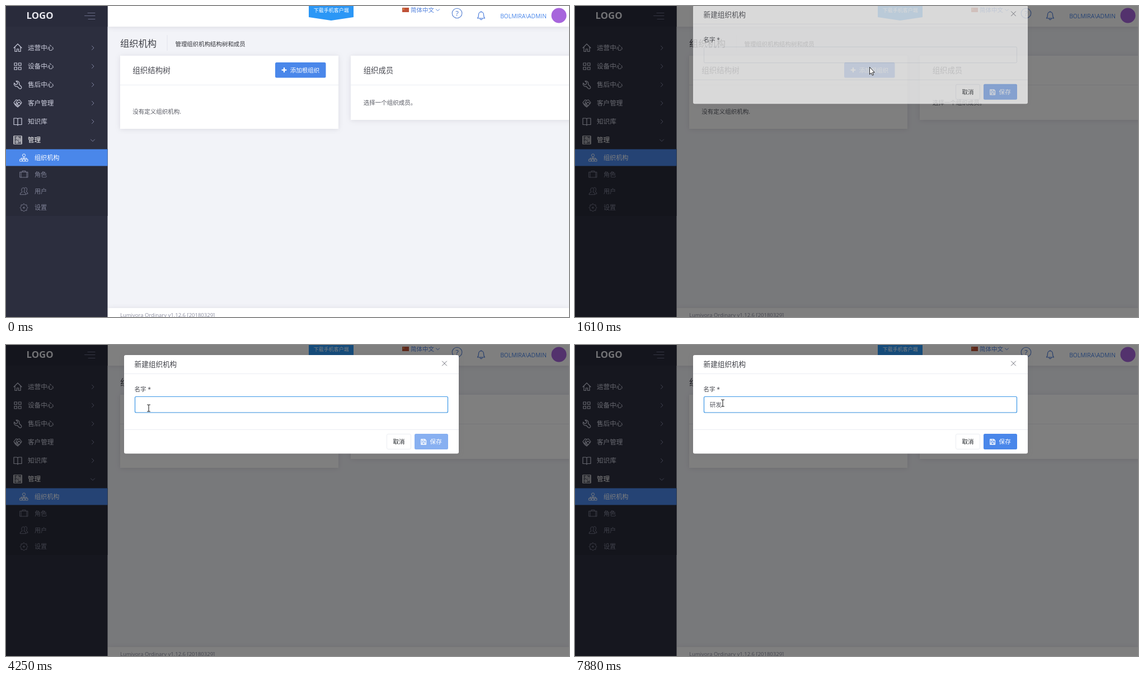
An HTML page for the animation above (8 s loop, 1006 px wide and 557 px high).

```html
<!DOCTYPE html>
<html lang="zh-CN">
<head>
<meta charset="utf-8">
<style>
html, body { margin: 0; width: 100%; height: 100%; overflow: hidden; background: #f2f3f8; }
svg { display: block; width: 1006px; height: 557px; }
text { font-family: "Open Sans", "Noto Sans CJK SC", "Noto Sans CJK", sans-serif; white-space: pre; }
.card { fill: #fff; filter: drop-shadow(0 1px 5px rgba(69, 65, 78, .13)); }
.ico { fill: none; stroke-linecap: round; stroke-linejoin: round; }
.ime { font-family: "Liberation Sans", "Noto Sans CJK SC", "Noto Sans CJK", sans-serif; }
.num { font-family: "Liberation Mono", monospace; }
</style>
</head>
<body>
<svg id="stage" viewBox="0 0 1006 557"></svg>
<script>
const BLUE = '#4a87ea';
const rect = (x, y, w, h, fill, more = '') =>
  `<rect x="${x}" y="${y}" width="${w}" height="${h}" fill="${fill}" ${more}/>`;
const text = (x, y, size, fill, str, more = '') =>
  `<text x="${x}" y="${y}" font-size="${size}" fill="${fill}" ${more}>${str}</text>`;
const icon = (x, y, d, color, width = 1, more = '') =>
  `<path class="ico" transform="translate(${x} ${y})" d="${d}" stroke="${color}" stroke-width="${width}" ${more}/>`;
const ring = (x, y, r) => `M${x - r} ${y}a${r} ${r} 0 1 0 ${2 * r} 0a${r} ${r} 0 1 0 ${-2 * r} 0`;
const box = (x, y, w, h) => `M${x} ${y}h${w}v${h}h${-w}z`;

const menu = [
  ['运营中心', 'M-7 0L0-7 7 0M-5-1.5V6.5H-1.5V2H1.5V6.5H5V-1.5'],
  ['设备中心', box(-6, -6, 4.5, 4.5) + box(1.5, -6, 4.5, 4.5) + box(-6, 1.5, 4.5, 4.5) + box(1.5, 1.5, 4.5, 4.5)],
  ['售后中心', 'M-3-6.5L0-3.5-1-1-3.5 0-6.5-3C-7.5 1-4 4-1 3L3 7C5 8 8 6 6.5 3.5L2.5-.5C4-4 1-7.5-3-6.5'],
  ['客户管理', 'M-7-1L-3-6 0-5 3-6 7-1 4 3 0 7-4 4ZM0-5L-3-1-1 1 2-2 6 1M-5 1L0 5M-2 1L2 4'],
  ['知识库', 'M0-5Q-1-6-2.5-6H-7V5.5H-2Q0 5.5 0 7 0 5.5 2 5.5H7V-6H2.5Q1-6 0-5V6'],
  ['管理', box(-7, -7, 14, 14) + 'M-7-3.5H-2M1-3.5H7M-7 0H2M5 0H7M-7 3.5H-3M0 3.5H7' + ring(-.5, -3.5, 1.5) + ring(3.5, 0, 1.5) + ring(-1.5, 3.5, 1.5)],
];
const submenu = [
  ['组织机构', ring(0, -4, 2.6) + 'M0-1.4V3M-5 3V1H5V3' + box(-7, 3, 4, 3.5) + box(-2, 3, 4, 3.5) + box(3, 3, 4, 3.5)],
  ['角色', box(-7, -4, 14, 9.5) + 'M-3-4V-6H3V-4M-5-4V5.5M5-4V5.5'],
  ['用户', 'M-7 6Q-7 3-3 2-5-1-4-4-2-7 1-5 2-2 0 2 4 3 4 6ZM2-6Q6-7 5.5-2 5 0 4 1 7 2 7 5H5'],
  ['设置', 'M0-7L2-5 5-5 5-2 7 0 5 2 5 5 2 5 0 7-2 5-5 5-5 2-7 0-5-2-5-5-2-5Z' + ring(0, 0, 1.2)],
];

const sidebar = rect(0, 0, 181.5, 557, '#2c2e3e') + rect(0, 0, 181.5, 37, '#292b3b') +
  rect(0, 256, 181.5, 120, '#282a38') + rect(0, 256.5, 181.5, 30, BLUE) +
  text(36.5, 23, 16.8, '#e6e6ec', 'LOGO', 'font-weight="700"') +
  icon(0, 0, 'M146 12.5H159M140.5 17.5H159M147 23.5H159', '#6a6d88') +
  menu.map(([label, d], i) => {
    const y = 75 + 33 * i, last = i == 5;
    return icon(21, y, d, last ? '#fff' : '#c9cbdb', 1.2) +
      text(39, y + 4.2, 11.6, last ? '#fff' : '#cfd1e0', label) +
      icon(155, y, last ? 'M-3.5-1L0 2.5 3.5-1' : 'M-1.5-3.5L2 0-1.5 3.5', '#7f83a0');
  }).join('') +
  submenu.map(([label, d], i) => {
    const y = 271.5 + 29.9 * i, c = i ? '#7e8196' : '#fff';
    return icon(32, y, d, c, .9) + text(51, y + 4.2, 11.1, c, label);
  }).join('');

const header = rect(181.5, 0, 825, 37, '#fff', 'class="card"') +
  `<path d="M541 0H621V20L581 26 541 20Z" fill="#2b97f6"/>` +
  text(549.7, 11, 9, '#fff', '下载手机客户端', 'font-weight="500"') +
  rect(708, 3, 12, 8, '#bf5238') + rect(709.5, 4.5, 2, 2, '#e8b04a') +
  text(723, 11.3, 10.5, '#4f7fdc', '简体中文') + icon(771.5, 7, 'M-3-1.2L0 1.8 3-1.2', '#4f7fdc') +
  icon(806, 13, ring(0, 0, 8.8), '#5580d2', 1.1) +
  text(806, 17.7, 13, '#4f7bd0', '?', 'text-anchor="middle"') +
  icon(849, 17, 'M-6.5 5H6.5Q4.5 3 4.5-1.5C4.5-8-4.5-8-4.5-1.5Q-4.5 3-6.5 5ZM-2 6Q0 9.5 2 6M0-6.5V-7.5', '#4f7fdc', 1.2, 'id="bell"') +
  text(966, 21.7, 10.3, BLUE, 'BOLMIRA\\ADMIN', 'text-anchor="end"') +
  '<circle cx="988" cy="17" r="13.5" fill="#a765dc"/>';

const page = text(204, 72.8, 16.3, '#3f4047', '组织机构') + rect(287.5, 52, 1, 28, '#e2e4ec') +
  text(302.5, 71.8, 10.45, '#33343a', '管理组织机构结构树和成员') +
  rect(204, 89, 390, 131, '#fff', 'class="card"') + rect(204, 141, 390, 1, '#ebedf2') +
  rect(616, 89, 420, 115, '#fff', 'class="card"') + rect(616, 141, 390, 1, '#ebedf2') +
  text(226.3, 119.5, 13.5, '#494a52', '组织结构树') + text(638.7, 119.5, 13.4, '#494a52', '组织成员') +
  text(226.3, 193, 10.5, '#575962', '没有定义组织机构.') + text(638.7, 177.3, 10.5, '#575962', '选择一个组织成员。') +
  rect(481, 101, 90.5, 27.5, BLUE, 'rx="2.5"') + icon(497, 114.6, 'M-3.5 0H3.5M0-3.5V3.5', '#fff', 2.3) +
  text(507.7, 118.5, 10.5, '#fff', '添加根组织') +
  rect(181.5, 541, 825, 16, '#fff', 'class="card"') +
  text(204, 557.3, 9.5, '#8b8da0', 'Lumivora Ordinary v1.12.6 [20180329]');

const modal = '<g id="modal">' + rect(211, 18, 598, 176.5, '#fff', 'rx="3" class="card"') +
  text(229.6, 39.4, 12.6, '#3f4047', '新建组织机构') + icon(783.5, 33, 'M-4-4L4 4M4-4L-4 4', '#6c6e78') +
  rect(211, 51, 598, 1, '#ebedf2') + rect(211, 151, 598, 1, '#ebedf2') +
  text(229.6, 83, 10.5, '#3f4047', '名字 *') +
  rect(230.5, 92.5, 559, 28.5, '#fff', 'rx="2" stroke="#e6e8ee"') +
  rect(230.5, 92.5, 559, 28.5, 'none', 'rx="2" stroke="#3b97e6" stroke-width="1.2" id="focus"') +
  text(240.7, 110.6, 10.6, '#575962', '研发', 'id="value"') + rect(241, 99, 1, 15, '#333', 'id="caret"') +
  rect(680.5, 159.5, 43, 27, '#fff', 'rx="2.5" stroke="#ebedf2"') + text(691.5, 177, 10.5, '#212529', '取消') +
  '<g id="save">' + rect(730, 159, 60, 28, BLUE, 'rx="2.5"') +
  icon(746, 173.5, 'M-4.2-4.5H2.5L4.5-2.5V4.5H-4.2ZM-2-4.5V-1.5H2V-4.5M-2.3 4.5V1.2H2.5V4.5', '#fff', 1.3) +
  text(757.6, 177.4, 10.6, '#fff', '保存', 'font-weight="500"') + '</g></g>';

const leaf = (x, y, len, angle, fill) =>
  `<path transform="translate(${x} ${y}) rotate(${angle})" d="M0 0Q${len * .45} ${-len * .42} ${len} 0Q${len * .45} ${len * .36} 0 0" fill="${fill}" stroke="#4f8c22" stroke-width=".6"/>`;
const blossom = (x, y, r) => [0, 72, 144, 216, 288].map(a =>
  `<ellipse cx="${r * .58}" rx="${r * .52}" ry="${r * .4}" transform="translate(${x} ${y}) rotate(${a - 90})" fill="#f9e3dc" stroke="#d59a94" stroke-width=".6"/>`
).join('') + `<circle cx="${x}" cy="${y}" r="${r * .2}" fill="#b9c05a"/>`;

const popup = `<defs><linearGradient id="paper"><stop offset="0" stop-color="#e3d8c1"/><stop offset=".35" stop-color="#eee7d6"/>
  <stop offset=".72" stop-color="#e6dcc5"/><stop offset=".8" stop-color="#d5e0a8"/><stop offset="1" stop-color="#bfd48c"/></linearGradient></defs>
  <g id="popup">` +
  rect(252, 121.5, 316, 50, 'url(#paper)', 'rx="7" stroke="#b9ab92" style="filter:drop-shadow(0 1px 1.5px #0008)"') +
  rect(262, 123.5, 220, 23, '#ddd2b9', 'opacity=".45"') +
  leaf(520, 143, 30, -45, '#6aae2e') + leaf(532, 137, 33, -38, '#83c43c') + leaf(528, 146, 32, 8, '#74b834') +
  leaf(524, 140, 22, -100, '#9ccb58') + leaf(536, 150, 18, 40, '#a8d06a') +
  blossom(507, 140, 12) + blossom(527, 148, 11) + blossom(511, 156, 13) +
  '<text class="ime" id="typed" x="263" y="140" font-size="12" font-weight="700" fill="#2c7410"></text>' +
  rect(297, 130, 1, 13, '#8c8a80', 'id="mark"') + '<g id="words"></g>' +
  '<path d="M457 155.5V162.5L453 159Z" fill="#c3b58e"/><path d="M461.5 154.5V163.5L466.5 159Z" fill="#2f7a12"/>' +
  rect(471.5, 153.5, 10, 11, '#eef0d4', 'stroke="#8aa060"') + '<path d="M473.5 157.5H479.5L476.5 161Z" fill="#2f7a12"/></g>';

const pointers = `<g id="pointer">
  <path id="arrow" d="M.5 .5V13.5L3.4 10.8 5.4 15.2 7.4 14.3 5.5 10H9.3Z" fill="#fff" stroke="#111" stroke-width=".9"/>
  <path id="hand" d="M-1.5 1.5Q0-.8 1.5 1.5V6.5Q3 5.5 4 7 5.5 6 6.3 7.7 8 7 8.5 9V13L7 17.5H-1.5Q-3-14 -1.5 17.5L-5.5 11Q-5.5 8.5-3.5 9.5L-1.5 11.5Z" fill="#fff" stroke="#111" stroke-width=".9"/>
  <path id="beam" class="ico" d="M-2.5-6H-1Q0-6 0-5 0-6 1-6H2.5M0-5V5M-2.5 6H-1Q0 6 0 5 0 6 1 6H2.5" stroke="#222" stroke-width="1.1"/></g>`;

const stage = document.getElementById('stage');
stage.innerHTML = rect(0, 0, 1006, 557, '#f2f3f8') + page + header + sidebar +
  rect(0, 0, 1006, 557, '#000', 'id="shade"') + modal + popup + pointers;

const el = id => document.getElementById(id);
const show = (id, on) => el(id).setAttribute('visibility', on ? 'inherit' : 'hidden');
const fade = (id, v) => el(id).setAttribute('opacity', v);
const ramp = (t, start, length) => Math.min(1, Math.max(0, (t - start) / length));
const within = (t, spans) => spans.some(([a, b]) => t >= a && t < b);

// time, x, y
const path = [[210, 919, 541], [400, 800, 400], [700, 600, 180], [850, 528, 112], [920, 521, 106], [990, 526, 109],
  [1740, 526, 109], [1850, 440, 113], [1920, 372, 118], [2000, 302, 120], [2070, 262, 114], [2230, 255, 113],
  [7879, 255, 113], [7880, 264, 104], [8000, 264, 104]];
function pointerAt(t) {
  const i = Math.max(1, path.findIndex(p => p[0] > t));
  const [a, b] = [path[i - 1], path[i]], k = ramp(t, a[0], b[0] - a[0]);
  return [a[1] + (b[1] - a[1]) * k, a[2] + (b[2] - a[2]) * k];
}

// typed letters with their candidates
const stages = [['y', '一 有 也 与 以'], ['ya', '呀 压 亚 牙 雅'], ['yan', '眼 研 演 言 盐'],
  ["yan'f", '研发 眼 演 延 盐'], ["yan'fa", '研发 延发 眼 演 盐']];
const bouts = [[2920, 3050, 3180, 3310, 3450, 3700], [4850, 4990, 5150, 5310, 5460, 5910]];
let typedStage = -1;
function setTyped(n) {
  if (n == typedStage) return;
  typedStage = n;
  const [letters, words] = stages[n];
  el('typed').textContent = letters;
  el('mark').setAttribute('x', 263.5 + el('typed').getComputedTextLength());
  let x = 260.5;
  el('words').innerHTML = words.split(' ').map((w, i) => {
    const c = i ? '#2f6d1c' : '#e2483c';
    const out = text(x, 163, 10, c, `${i + 1}.`, 'class="num"') + text(x + 12, 163.3, 12, c, w, 'class="ime"');
    x += 22 + 12 * w.length - (i > 1 ? .5 : 0);
    return out;
  }).join('');
}

function draw() {
  const t = performance.now() % 8000;

  fade('shade', .5 * ramp(t, 1270, 330));
  const drop = -44 * (1 - ramp(t, 1505, 300)) ** 1.9;
  el('modal').setAttribute('transform', `translate(0 ${drop})`);
  fade('modal', ramp(t, 1505, 150));
  fade('focus', ramp(t, 2300, 230));
  fade('save', .65 + .35 * ramp(t, 5840, 240));
  fade('bell', within(t, [[2770, 5770]]) ? .625 + .375 * Math.cos((t - 2770) / 1000 * 4 * Math.PI) : 1);

  const bout = bouts.find(b => t >= b[0] && t < b[5]);
  show('popup', bout);
  if (bout) setTyped(bout.filter(k => k <= t).length - 1);

  show('value', t >= 5910);
  el('caret').setAttribute('x', t >= 5910 ? 262 : 241);
  show('caret', within(t, [[2380, 2920], [3700, 4230], [4770, 4850], [5910, 6630], [7180, 7720]]));

  const [x, y] = pointerAt(t);
  el('pointer').setAttribute('transform', `translate(${x} ${y})`);
  const hand = within(t, [[800, 1060]]);
  show('hand', hand);
  show('arrow', !hand && within(t, [[210, 1740]]));
  show('beam', t >= 1740);
  requestAnimationFrame(draw);
}
draw();
</script>
</body>
</html>
```
